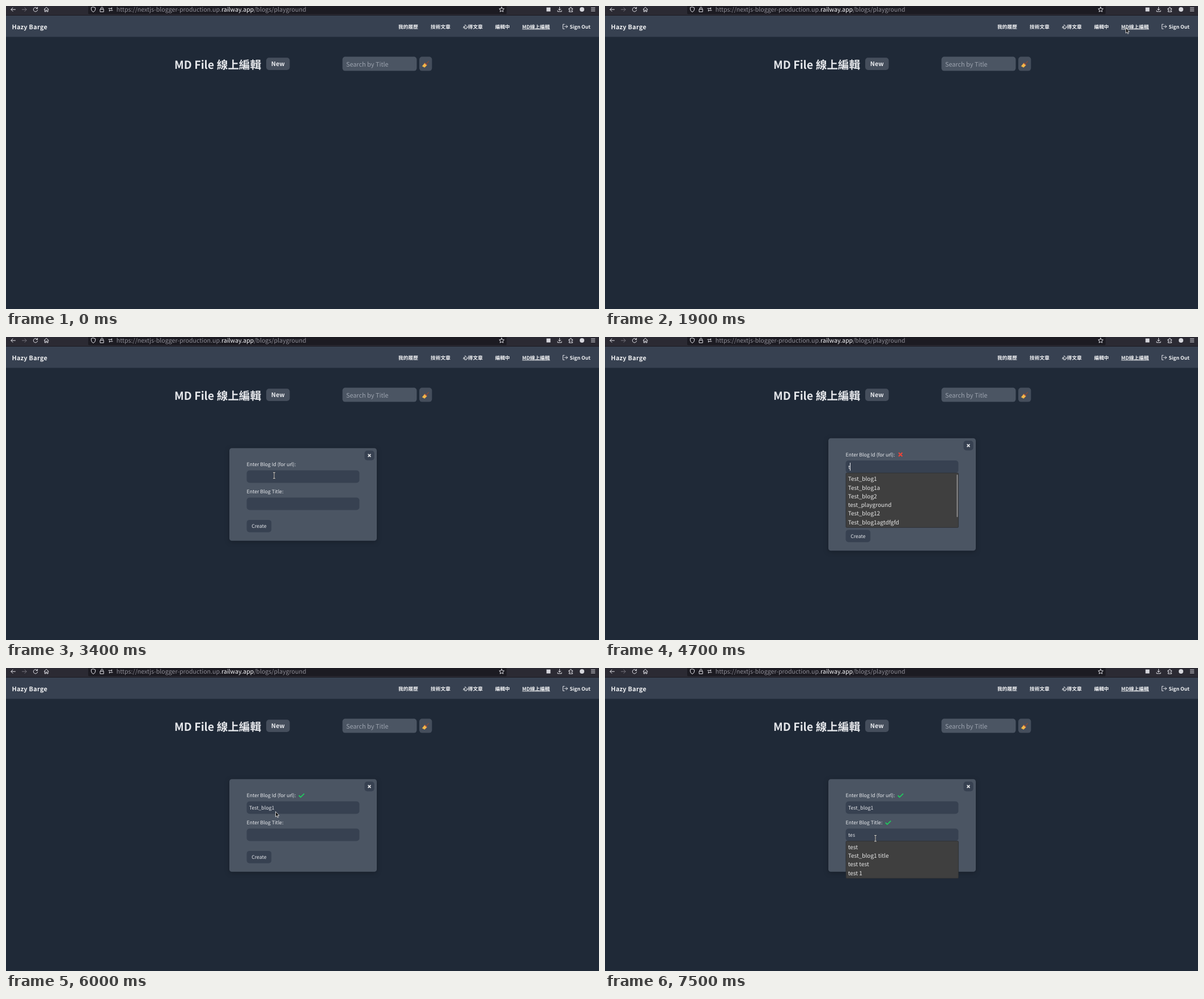
Animation of 1046x535 px, one loop 8 s. Source, as an HTML page:

```html
<!DOCTYPE html>
<html lang="zh-Hant">
<head>
<meta charset="utf-8">
<title>Blog editor</title>
<style>
  html, body { margin: 0; width: 100%; height: 100%; overflow: hidden; background: #1f2937; }
  svg { display: block; }
  text { font-family: 'Noto Sans CJK TC', 'Noto Sans CJK JP', 'Noto Sans', sans-serif; text-rendering: geometricPrecision; white-space: pre; }
  .line { fill: none; stroke: #e4e4ea; stroke-width: 1; stroke-linecap: round; stroke-linejoin: round; }
  .modal { filter: drop-shadow(0 2px 4px rgba(0, 0, 0, .25)); }
</style>
</head>
<body>
<svg width="1046" height="535" viewBox="0 0 1046 535">
  <rect width="1046" height="535" fill="#1f2937"/>
  <rect y="17" width="1046" height="37.5" fill="#374151"/>
  <rect width="1046" height="17" fill="#2b2a33"/>
  <rect y="16" width="1046" height="1" fill="#1d1c24"/>
  <path d="M145 0H883V12.5a2 2 0 0 1-2 2H147a2 2 0 0 1-2-2z" fill="#1c1b22"/>
  <g class="line">
    <path d="M16.5 6.2H9M12 3L8.8 6.2L12 9.4"/>
    <path d="M28.5 6.2H36M33 3L36.2 6.2L33 9.4" stroke="#74737c" style="stroke:#74737c"/>
    <path d="M55 4A3.7 3.7 0 1 0 55.7 7M55.6 2.2V4.6H53.2"/>
    <path d="M67.2 6L71.2 2.2L75.2 6M68.3 5.5V10H70.2V7.2H72.2V10H74.1V5.5"/>
    <path d="M154 1.8L157.6 3V6Q157.4 9 154 10.6Q150.6 9 150.4 6V3z"/>
    <path d="M166.4 5.6H172.2V10.2H166.4zM167.5 5.4V3.8a1.8 1.8 0 0 1 3.6 0V5.4"/>
    <path d="M181 4.4H186M183 7.8H188M186.6 3v2.8M182.4 6.4v2.8" />
    <path d="M874.3 1.8L875.6 4.7L878.7 5L876.4 7.1L877 10.2L874.3 8.6L871.6 10.2L872.2 7.1L869.9 5L873 4.7z"/>
    <path d="M976.5 2V7.2M974.3 5.2L976.5 7.4L978.7 5.2M973 8V9.8H980V8"/>
    <path d="M993.2 4.4H995V3.4a1.2 1.2 0 0 1 2.4 0V4.4H999.4V6.4H998.6a1.1 1.1 0 0 0 0 2.2H999.4V10.2H993.2V8.4H994a1 1 0 0 0 0-2H993.2z"/>
    <path d="M1032.3 3.2H1038.8M1032.3 6H1038.8M1032.3 8.8H1038.8"/>
    <path d="M985 32.3H982.4V40.3H985M985.2 36.3H990.4M988.2 33.9L990.6 36.3L988.2 38.7"/>
  </g>
  <rect x="953.4" y="2.6" width="7" height="7" fill="#d6d6dc"/>
  <circle cx="1016" cy="6.1" r="4" fill="#d6d6dc"/>
  <g id="live"></g>
</svg>
<script>
const live = document.getElementById('live');
const LOOP = 8000, STEP = 100;
const HOST = 'https://nextjs-blogger-production.up.';

const text = (s, x, y, size = 8.72, fill = '#e5e7eb', weight = 400, extra = '') =>
  `<text x="${x}" y="${y}" font-size="${size}" fill="${fill}" font-weight="${weight}" ${extra}>${s}</text>`;
const box = (x, y, w, h, fill, r = 0, extra = '') =>
  `<rect x="${x}" y="${y}" width="${w}" height="${h}" rx="${r}" fill="${fill}" ${extra}/>`;
const path = (d, stroke, width, fill = 'none') =>
  `<path d="${d}" stroke="${stroke}" stroke-width="${width}" fill="${fill}" stroke-linejoin="round"/>`;

const pages = {
  playground: { title: 'MD File 線上編輯', newX: 459 },
  edit: { title: '編輯中', newX: 364.5 }
};
// label, x, width, page
const nav = [
  ['我的履歷', 692, 35], ['技術文章', 749, 35], ['心得文章', 806, 35],
  ['編輯中', 862.7, 26.2, 'edit'], ['MD線上編輯', 910.6, 48.9, 'playground']
];
const idList = ['Test_blog1', 'Test_blog1a', 'Test_blog2', 'test_playground', 'Test_blog12', 'Test_blog1agtdfgfd'];
const titleList = ['test', 'Test_blog1 title', 'test test', 'test 1'];

// Each entry changes part of the state from its time on.
const steps = [
  [0, { page: 'playground', hover: '', status: '', hot: 0, modal: 0, id: '', title: '', space: 0 }],
  [900, { hover: 'edit' }],
  [1000, { status: 'edit' }],
  [1300, { page: 'edit' }],
  [1400, { hover: '' }],
  [1600, { hover: 'playground', status: 'playground' }],
  [1800, { page: 'playground' }],
  [1900, { hover: '', status: '' }],
  [2600, { hot: 1 }],
  [2800, { modal: .5 }],
  [2900, { modal: 1, hot: 0 }],
  [3700, { caret: [1, 429] }],
  [4400, { tip: 1 }],
  [4700, { tip: 0, id: 't', idMark: 'bad', caret: [1, 432], space: 35, list: 1, row: -1 }],
  [4900, { caret: null }],
  [5400, { row: 1 }],
  [5600, { row: 0 }],
  [5800, { pressed: 1 }],
  [6000, { id: 'Test_blog1', idMark: 'ok', space: 0, list: 0 }],
  [6400, { hint: 1, space: 26.5, caret: [2, 429] }],
  [6800, { title: 't', titleMark: 'ok', caret: [2, 432] }],
  [7100, { title: 'te', hint: 0, space: 0, list: 2, row: -1, caret: [2, 437] }],
  [7200, { title: 'tes', caret: [2, 441] }],
  [7500, { caret: null }]
];

// The pointer travels between two times to x, y and then takes the given shape.
const moves = [
  [300, 300, 678, 149, 'arrow'], [300, 600, 872, 29, 'arrow'], [700, 700, 892, 40, 'arrow'],
  [900, 900, 883, 38.5, 'hand'], [1300, 1600, 938, 36, 'hand'], [1800, 2600, 486.5, 97, 'hand'],
  [2900, 2900, 488.5, 99.5, 'arrow'], [3100, 3100, 534, 117, 'arrow'], [3400, 3400, 473, 244.5, 'beam'],
  [3700, 3700, 476.8, 242.5, 'beam'], [3900, 3900, 482, 237, 'beam'], [4700, 4700, 482, 237, ''],
  [5200, 5200, 479.3, 241.2, 'arrow'], [5400, 5400, 478, 261.5, 'arrow'], [5600, 5600, 475.5, 253.5, 'arrow'],
  [6000, 6200, 474.2, 294.8, 'beam'], [6800, 6800, 474, 295, ''], [7300, 7300, 477, 300.8, 'beam']
];

const shapes = {
  arrow: path('M0 0V9.3L2.1 7.4L3.5 10.6L5 9.9L3.6 6.9H6.3z', '#f4f4f4', .8, '#111'),
  hand: path('M-1 .8Q0 -.6 1 .8V3.6L4.2 4.4Q5.3 4.8 5 6.2L4.3 9.3H-.7L-3 5.9Q-2.6 4.7 -1 6z', '#f4f4f4', .7, '#111'),
  beam: path('M-2.2 -5.2H2.2M-2.2 5.2H2.2M0 -5.2V5.2', '#222', 1.8) +
    path('M-2 -5.2H2M-2 5.2H2M0 -5.2V5.2', '#eee', .9)
};

function pointer(t) {
  let x = 0, y = 0, kind = '';
  for (const [from, to, toX, toY, shape] of moves) {
    if (t < from) break;
    const p = to > from ? Math.min(1, (t - from) / (to - from)) : 1;
    const e = p * p * (3 - 2 * p);
    x += (toX - x) * e;
    y += (toY - y) * e;
    if (p === 1) kind = shape;
    else if (p > 0) kind = 'arrow';
  }
  return kind && `<g transform="translate(${x.toFixed(2)} ${y.toFixed(2)})">${shapes[kind]}</g>`;
}

function mark(kind, x, y) {
  if (kind === 'ok') return path(`M${x - 4.6} ${y}l3 3.1l6.4-6.2`, '#22c55e', 2);
  if (kind === 'bad') return path(`M${x - 3.2} ${y - 3.2}l6.4 6.4m0-6.4l-6.4 6.4`, '#ef4438', 2.1);
  return '';
}

function header(s) {
  const page = pages[s.page];
  const [grey, white] = ['#8e8d96', '#fbfbfe'];
  let out = text(`${HOST}<tspan fill="${white}">railway.app</tspan>/blogs/${s.page}`, 194.8, 10, 10.61, grey);
  out += text('Hazy Barge', 10.4, 41, 10.9, '#f3f4f6', 700, 'letter-spacing=".27"');
  for (const [label, x, w, to] of nav) {
    out += text(label, x, 39.7, 8.72, '#f3f4f6', 700);
    if (to && (to === s.page || to === s.hover)) out += box(x, 40.6, w, .9, '#f3f4f6');
  }
  out += text('Sign Out', 994.2, 39.7, 8.72, '#f3f4f6', 700);
  out += text(page.title, 297, 110.5, 19.62, '#e5e7eb', 700);
  out += box(page.newX, 91.2, 41.5, 21.8, s.hot ? '#6b7280' : '#454e5c', 5);
  out += text('New', page.newX + 8.8, 105.8, 10.9, '#e5e7eb', 700);
  out += box(593.5, 89.6, 131, 25, '#4b5563', 5) + text('Search by Title', 599.9, 106.7, 10.9, '#9ca3af');
  out += box(729, 89.6, 22.4, 25, '#454e5c', 5);
  out += path('M741 102.4L746 97.4', '#8f4a35', 1.3);
  out += path('M738.6 100.8L742.4 104.4L738.4 108.6L734.2 106.2z', '#e9a93f', .5, '#f2b84b');
  out += path('M738.6 100.8L742.4 104.4', '#c0503c', 1.2);
  return out;
}

function dropdown(items, y, s) {
  const pitch = 15.28, height = items.length * pitch + 4.6;
  let out = box(425, y, 198.4, height, '#3f3f3f', 1.5, 'stroke="#2c2f33" stroke-width=".8"');
  if (s.row >= 0) out += box(426, y + 2.8 + s.row * pitch, 194.6, pitch, s.pressed ? '#666' : '#5a5a5a');
  items.forEach((item, i) => out += text(item, 428.7, y + 14.2 + i * pitch, 10, '#e8e8e8'));
  if (items.length > 4) out += box(620.4, y + 3, 2, 75, '#8c8c8c', 1);
  return out;
}

function modal(s) {
  const height = 163.6 + s.space, top = 278 - height / 2;
  const shift = s.list === 1 ? s.space : 0;
  const field = (label, value, kind, y, x) =>
    text(label, 424.6, y + 32.2) + mark(kind, x, y + 28.8) +
    box(424.6, y + 39.4, 198.8, 21.8, '#374151', 5) + text(value, 428.9, y + 54);
  let out = box(394, top, 260, height, '#4b5563', 4.4, 'class="modal"');
  out += box(632.4, top + 4.4, 17.2, 17.2, '#374151', 5);
  out += path(`M638.6 ${top + 10.6}l4.8 4.8m0-4.8l-4.8 4.8`, '#f3f4f6', 1.6);
  out += field('Enter Blog Id (for url):', s.id, s.idMark, top, 521.2);
  out += field('Enter Blog Title:', s.title, s.titleMark, top + 48 + shift, 499.4);
  if (s.hint) {
    const y = top + 113.3;
    out += box(424.6, y, 198.8, 17.8, '#3f4a59', 3);
    out += `<circle cx="436.7" cy="${y + 8.9}" r="3.2" fill="#f3f4f6"/>`;
    out += box(436.2, y + 8.4, 1, 2.4, '#3f4a59') + box(436.2, y + 6.7, 1, 1, '#3f4a59');
    out += text('At least 1 character.', 444.2, y + 11.4, 6.54);
  }
  out += box(424.6, top + 126.7 + s.space, 43.6, 21.8, '#374151', 5);
  out += text('Create', 433.2, top + 141.2 + s.space);
  if (s.caret) out += box(s.caret[1], top + (s.caret[0] === 1 ? 43.3 : 91.3), 1, 14, '#e5e7eb');
  if (s.list === 1) out += dropdown(idList, top + 61.4, s);
  if (s.list === 2) out += dropdown(titleList, top + 109.4, s);
  if (s.tip) {
    out += box(483.4, 248.4, 88.2, 26.2, '#2b2a33', 3, 'stroke="#52525e" stroke-width=".7"');
    out += text('請填寫此欄位。', 492.5, 265.2, 10.1, '#fbfbfe');
  }
  return `<g opacity="${s.modal}">${out}</g>`;
}

function scene(t) {
  const s = Object.assign({}, ...steps.filter(([at]) => at <= t).map(([, change]) => change));
  let out = header(s);
  if (s.modal) out += modal(s);
  if (s.status) {
    out += box(0, 521, s.status === 'edit' ? 289 : 325, 14, '#2b2d35');
    out += text(`${HOST}railway.app/blogs/${s.status}`, 1.6, 533.8, 10.11, '#8e8f98');
  }
  return out + pointer(t);
}

const start = performance.now();
let shown = -1;
function tick() {
  const t = Math.floor(((performance.now() - start) % LOOP) / STEP) * STEP;
  if (t !== shown) live.innerHTML = scene(shown = t);
  requestAnimationFrame(tick);
}
tick();
</script>
</body>
</html>
```
